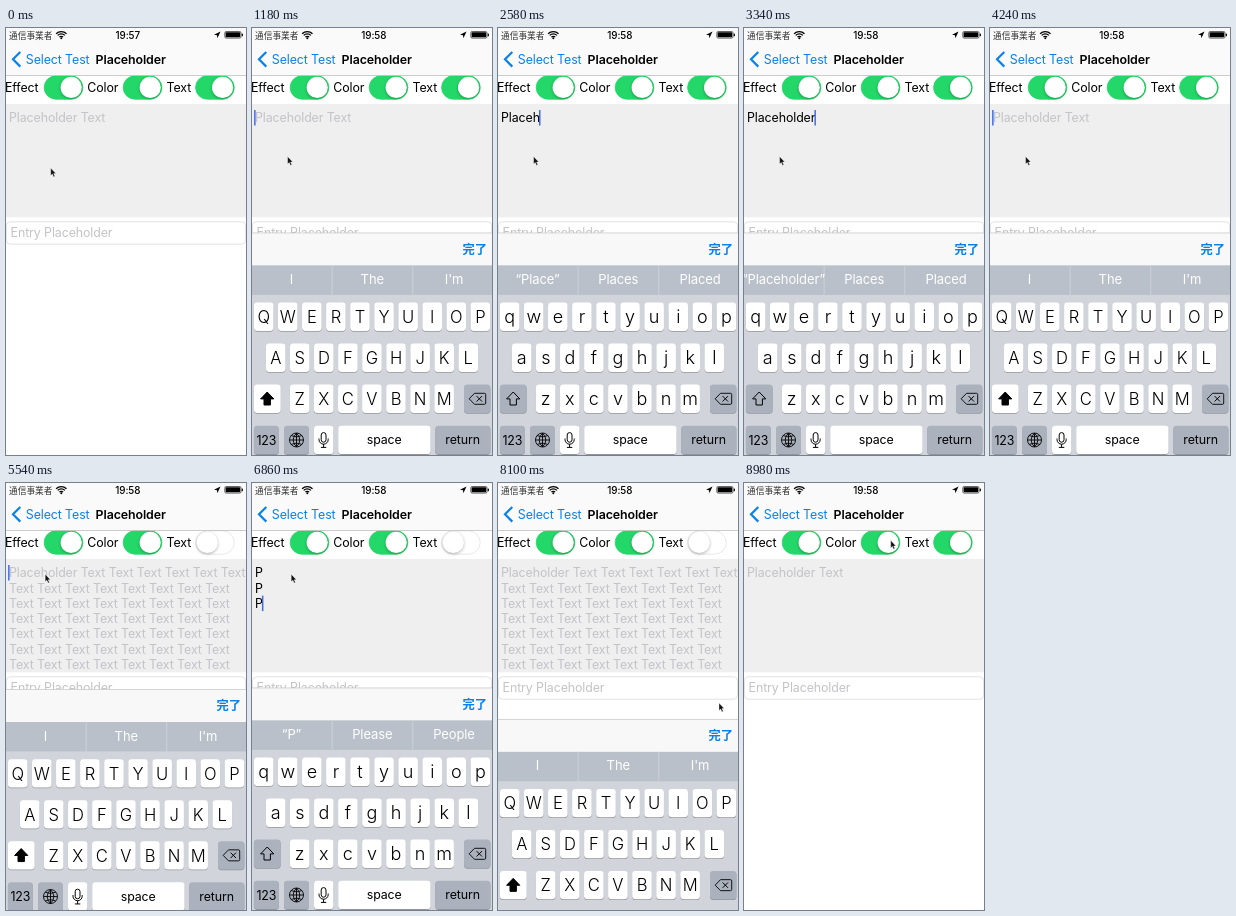
An HTML page that plays this animation: 240 px wide and 427 px high, repeating every 9000 ms.

```html
<!DOCTYPE html>
<html lang="en">
<head>
<meta charset="utf-8">
<title>Placeholder</title>
<style>
  html, body { margin: 0; width: 100%; height: 100%; overflow: hidden; background: #fff; }
  svg { display: block; width: 100%; height: 100%; }
  text { font: 12.4px Inter, "Noto Sans CJK JP", "Noto Sans CJK", sans-serif; letter-spacing: -.1px; white-space: pre; }
  .mid { text-anchor: middle; }
  .hint { fill: #c3c3c8; }
  .blue { fill: #0a80ea; }
  .knob { filter: drop-shadow(0 1.8px 1.6px rgba(0, 0, 0, .3)); }
</style>
</head>
<body>
<svg id="stage" viewBox="0 0 240 427" preserveAspectRatio="none"></svg>
<script>
const LOOP = 9000;
const KEYBOARD_H = 223;
const LINE = 15.3;
const SPRING = 16;
const stage = document.getElementById('stage');

function add(parent, tag, attrs = {}, content) {
  const el = document.createElementNS('http://www.w3.org/2000/svg', tag);
  for (const name in attrs) el.setAttribute(name, attrs[name]);
  if (content !== undefined) el.textContent = content;
  parent.appendChild(el);
  return el;
}
const rect = (parent, x, y, width, height, fill, rx = 0) =>
  add(parent, 'rect', { x, y, width, height, fill, rx });
const path = (parent, d, attrs) => add(parent, 'path', { d, fill: 'none', ...attrs });
const label = (parent, x, y, content, attrs) => add(parent, 'text', { x, y, ...attrs }, content);
const group = (parent = stage) => add(parent, 'g');
const show = (el, on) => el.setAttribute('visibility', on ? 'visible' : 'hidden');
const setText = (el, s) => { if (el.textContent !== s) el.textContent = s; };

// Editor and entry
const clip = add(add(stage, 'defs'), 'clipPath', { id: 'editor' });
rect(clip, 0, 76, 240, 113);
rect(stage, 0, 76, 240, 113.3, '#efefef');
const editor = add(stage, 'g', { 'clip-path': 'url(#editor)' });
const lines = Array.from({ length: 8 }, (_, i) => label(editor, 3, 94.2 + i * LINE, ''));
const caret = rect(editor, 2, 82, 1.5, 15.5, '#3f6bea');

add(stage, 'rect', { x: .4, y: 193.8, width: 239.2, height: 22.4, rx: 4, fill: '#fff', stroke: '#d6d6d6', 'stroke-width': .7 });
label(stage, 4.6, 209.4, 'Entry Placeholder', { class: 'hint' });

// Switches
function makeSwitch(x) {
  const track = rect(stage, x, 47.8, 38.6, 23.4, '#23d868', 11.7);
  track.setAttribute('stroke-width', .8);
  const knob = group();
  add(knob, 'circle', { cy: 59.4, r: 10.6, fill: '#fff', class: 'knob' });
  return on => {
    const v = Math.round(255 - on * 220);
    track.setAttribute('fill', `rgb(${v},${Math.round(255 - on * 39)},${Math.round(255 - on * 151)})`);
    track.setAttribute('stroke', on > .5 ? '#23d868' : '#e3e3e3');
    knob.setAttribute('transform', `translate(${x + 11.7 + on * 15.3})`);
  };
}
[['Effect', -1], ['Color', 81.3], ['Text', 160.6]].forEach(([s, x]) => label(stage, x, 63.8, s));
makeSwitch(38.2)(1);
makeSwitch(117.2)(1);
const textSwitch = makeSwitch(189.6);

// Status and navigation bars
rect(stage, 0, 0, 240, 47.5, '#fafafa');
rect(stage, 0, 47.2, 240, .7, '#b8b8b8');
label(stage, 3, 10.7, '通信事業者', { fill: '#333', style: 'font-size:8.7px;letter-spacing:0' });
for (const r of [2.6, 5, 7.2]) {
  const s = r * .72;
  path(stage, `M${55.3 - s} ${11 - s}A${r} ${r} 0 0 1 ${55.3 + s} ${11 - s}`, { stroke: '#000', 'stroke-width': 1.3 });
}
add(stage, 'circle', { cx: 55.3, cy: 10.2, r: 1, fill: '#000' });
const clock = label(stage, 121.8, 10.7, '', { class: 'mid', style: 'font-size:9.9px;font-weight:500' });
path(stage, 'M214.5 3.5L208 6.8L211 7.2L211.4 10.3Z', { fill: '#000' });
add(stage, 'rect', { x: 218.8, y: 3.5, width: 16.2, height: 6.6, rx: 1.4, fill: 'none', stroke: '#000', 'stroke-width': .6 });
rect(stage, 219.6, 4.3, 14.6, 5, '#000', .7);
rect(stage, 235.7, 5.4, 1.2, 2.8, '#000', .5);
path(stage, 'M14.3 24L7 31.3L14.3 38.6', { stroke: '#0a80ea', 'stroke-width': 2.2 });
label(stage, 19.8, 35.8, 'Select Test', { class: 'blue' });
label(stage, 89.6, 35.8, 'Placeholder', { style: 'font-weight:600;letter-spacing:-.1px' });

// Keyboard
const keyboard = group();
rect(keyboard, 0, 205, 240, 33, '#f8f8f9');
rect(keyboard, 0, 204.6, 240, .7, '#c4c4c6');
label(keyboard, 222.7, 225.7, '完了', { class: 'mid blue', style: 'font-weight:700;font-size:12.3px' });
rect(keyboard, 0, 237.5, 240, 190, '#d1d5db');
rect(keyboard, 0, 237.5, 240, 29.4, '#b9c0ca');
for (const x of [79.7, 160.4]) rect(keyboard, x, 237.5, .8, 29.4, '#d1d5db');
const hints = [39.5, 120.3, 202].map(x =>
  label(keyboard, x, 256, '', { class: 'mid', fill: '#fff', style: 'font-size:13px' }));

function key(x, y, w, fill = '#fff') {
  rect(keyboard, x, y + .8, w, 28.3, '#92959b', 3.4);
  return rect(keyboard, x, y, w, 28.3, fill, 3.4);
}
const GREY = '#abb2be';
const letters = [];
[['QWERTYUIOP', 1.9, 274.6], ['ASDFGHJKL', 13.9, 315.6], ['ZXCVBNM', 37.9, 356.6]].forEach(([row, x0, y]) =>
  [...row].forEach((c, i) => {
    const x = x0 + i * 24.07;
    key(x, y, 19.6);
    letters.push([c, label(keyboard, x + 9.8, y + 20.4, c, { class: 'mid' })]);
  }));

const shiftKey = key(1.9, 356.6, 26.8);
const shiftIcon = path(keyboard, 'M15.2 364L21.8 370.9H18.4V377H12V370.9H8.6Z',
  { stroke: '#000', 'stroke-width': 1, 'stroke-linejoin': 'round' });
key(212, 356.6, 26.4, GREY);
path(keyboard, 'M222.5 365.3H232.5Q233.7 365.3 233.7 366.5V375.1Q233.7 376.3 232.5 376.3H222.5L217.2 370.8Z',
  { stroke: '#000', 'stroke-width': .9 });
path(keyboard, 'M224.6 368.1L230 373.5M230 368.1L224.6 373.5', { stroke: '#000', 'stroke-width': 1 });

key(1.9, 397.8, 25, GREY);
label(keyboard, 14.4, 416.7, '123', { class: 'mid' });
key(32, 397.8, 25, GREY);
path(keyboard, 'M37.5 412a7 7 0 1 0 14 0a7 7 0 1 0 -14 0H51.5M44.5 405V419M44.5 405Q37.8 412 44.5 419Q51.2 412 44.5 405M39.2 407.6Q44.5 410.2 49.8 407.6M39.2 416.4Q44.5 413.8 49.8 416.4',
  { stroke: '#000', 'stroke-width': .9 });
key(62, 397.8, 19.4);
add(keyboard, 'rect', { x: 69.2, y: 404.6, width: 4.8, height: 9.6, rx: 2.4, fill: 'none', stroke: '#000', 'stroke-width': 1 });
path(keyboard, 'M67 410.5V411.6A4.6 4.6 0 0 0 76.2 411.6V410.5M71.6 416.2V419.3M68.9 419.4H74.3', { stroke: '#000', 'stroke-width': 1 });
key(86.2, 397.8, 92.4);
label(keyboard, 132.2, 416, 'space', { class: 'mid' });
key(183.2, 397.8, 55.2, GREY);
label(keyboard, 210.7, 416, 'return', { class: 'mid' });

const pointer = path(stage, 'M0 0V7.6L1.7 6.1L2.9 8.9L4.2 8.3L3 5.6H5.2Z',
  { fill: '#111', stroke: '#fff', 'stroke-width': .4 });

// Timeline: text edits as [time, value]
const edits = [[0, '']];
const WORD = 'Placeholder';
[1400, 1590, 1780, 1980, 2200, 2440, 2620, 2710, 2800, 2900, 3000]
  .forEach((t, i) => edits.push([t, WORD.slice(0, i + 1)]));
for (let i = 1; i <= WORD.length; i++) edits.push([3340 + i * 58, WORD.slice(0, -i)]);
const PARAS = 'P\nP\nP';
[5900, 6120, 6320, 6520, 6700].forEach((t, i) => edits.push([t, PARAS.slice(0, i + 1)]));
for (let i = 1; i <= 5; i++) edits.push([7100 + i * 90, PARAS.slice(0, -i)]);

const guesses = {
  '': ['I', 'The', "I'm"],
  P: ['“P”', 'Please', 'People'],
  Pl: ['“Pl”', 'Please', 'Play'],
  Pla: ['“Pla”', 'Place', 'Play'],
  Plac: ['“Plac”', 'Place', 'Places'],
  Place: ['“Place”', 'Places', 'Placed']
};
const moves = [
  [0, 44.7, 140], [120, 44.7, 140], [320, 35.6, 128.5], [4380, 35.6, 128.5], [4620, 221, 220],
  [4700, 221, 220], [4840, 208, 58], [4920, 208, 58], [5080, 39.2, 91.2], [7660, 39.2, 91.2],
  [8000, 221, 220], [8120, 221, 220], [8380, 208, 58], [8560, 208, 58], [8820, 146.7, 57.3], [9000, 146.7, 57.3]
];
const slides = [[340, 1], [4660, 0], [5100, 1], [8060, 0]];
const LONG = ['Placeholder' + ' Text'.repeat(6), ...Array(7).fill('Text' + ' Text'.repeat(7))];

const lastAt = (list, t) => list.reduce((found, item) => item[0] <= t ? item : found, list[0]);
const clamp = v => Math.max(0, Math.min(1, v));
const smooth = v => v * v * (3 - 2 * v);

function pointerAt(t) {
  const i = Math.max(1, moves.findIndex(m => m[0] > t));
  const [a, b] = [moves[i - 1], moves[i]];
  const p = smooth((t - a[0]) / (b[0] - a[0]));
  return [a[1] + (b[1] - a[1]) * p, a[2] + (b[2] - a[2]) * p];
}

function raised(t) {
  const [start, up] = lastAt(slides, t);
  if (t < start) return 0;
  const s = SPRING * (t - start) / 1000;
  const rest = (1 + s) * Math.exp(-s);
  const left = rest < .0025 ? 0 : rest;
  return up ? 1 - left : left;
}

function draw(t) {
  setText(clock, t < 460 ? '19:57' : '19:58');
  const [editTime, value] = lastAt(edits, t);
  const short = t < 4890 || t >= 8480;
  const on = 1 - smooth(clamp((t - 4880) / 220)) + smooth(clamp((t - 8470) / 240));
  textSwitch(on);

  const typed = value.split('\n');
  const shown = value ? typed : short ? ['Placeholder Text'] : LONG;
  lines.forEach((line, i) => {
    setText(line, shown[i] || '');
    line.setAttribute('fill', value ? '#000' : '#c3c3c8');
  });

  const [slideTime, focused] = lastAt(slides, t);
  const row = typed.length - 1;
  const width = typed[row] ? lines[row].getComputedTextLength() : 0;
  caret.setAttribute('x', 2.1 + width);
  caret.setAttribute('y', 82 + row * LINE);
  const idle = t - Math.max(editTime, slideTime);
  show(caret, focused && t >= slideTime && idle % 1000 < 850);

  const up = raised(t);
  keyboard.setAttribute('transform', `translate(0 ${(1 - up) * KEYBOARD_H})`);
  show(keyboard, up > 0);
  const caps = !typed[row];
  letters.forEach(([c, el]) => {
    setText(el, caps ? c : c.toLowerCase());
    el.style.fontSize = caps ? '16.6px' : '18px';
    el.style.fontWeight = caps ? 350 : 300;
  });
  shiftKey.setAttribute('fill', caps ? '#fff' : GREY);
  shiftIcon.setAttribute('fill', caps ? '#000' : 'none');

  // Suggestions trail the typing slightly
  const word = lastAt(edits, Math.max(0, t - 150))[1].split('\n').pop();
  const words = guesses[word] || [`“${word}”`, 'Places', 'Placed'];
  hints.forEach((el, i) => setText(el, words[i]));

  pointer.setAttribute('transform', `translate(${pointerAt(t)})`);
}

const begin = performance.now();
function tick() {
  draw((performance.now() - begin) % LOOP);
  requestAnimationFrame(tick);
}
draw(0);
requestAnimationFrame(tick);
</script>
</body>
</html>
```
